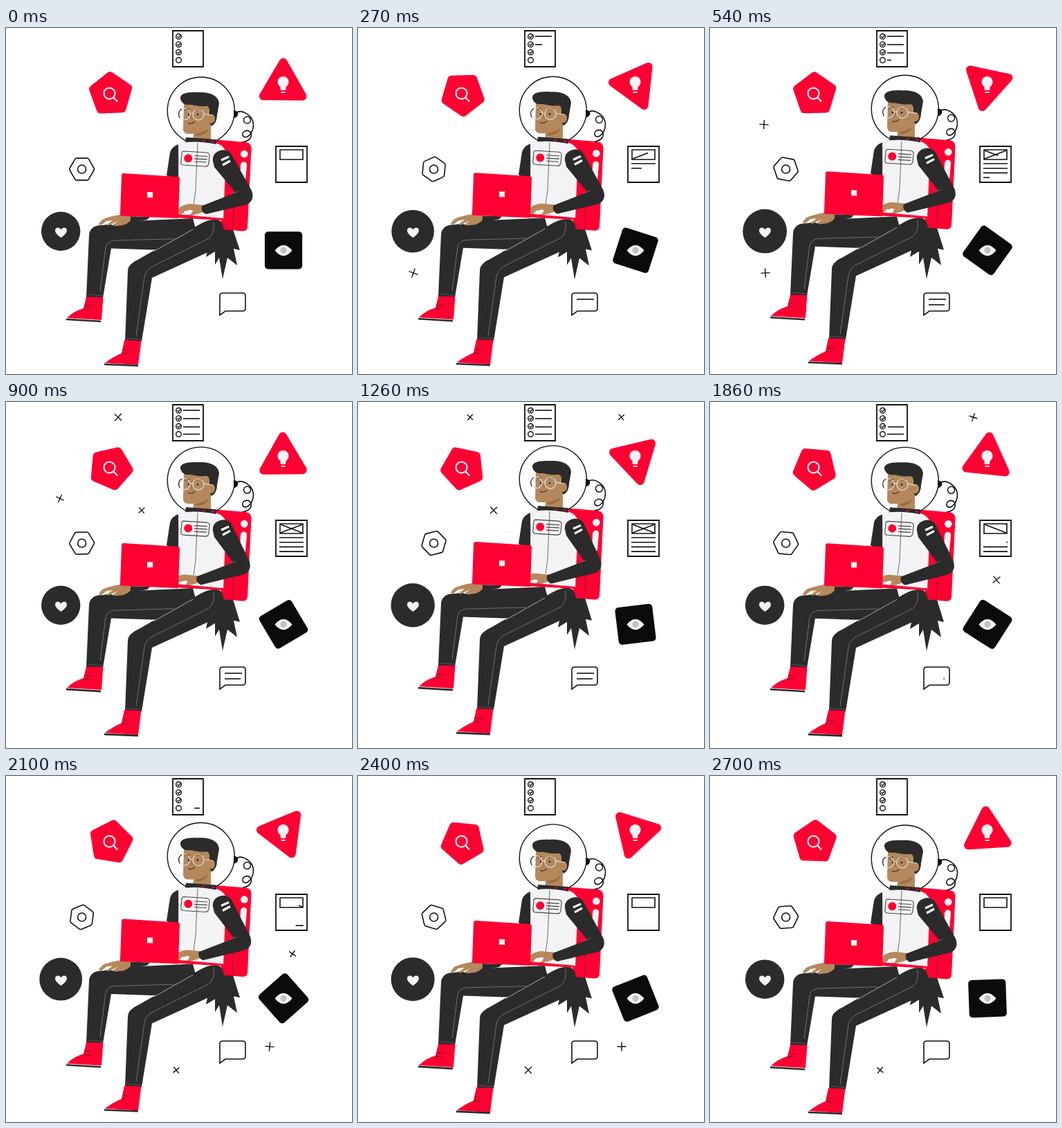
Recreate the animation shown at these times as an HTML page with a canvas. Size 500 by 500 pixels, loop 2.73 s.

```html
<!DOCTYPE html>
<html lang="en">
<head>
<meta charset="utf-8">
<title>Floating astronaut</title>
<style>
  html, body { margin: 0; width: 100%; height: 100%; overflow: hidden; background: #fff; }
  canvas { display: block; width: 500px; height: 500px; }
</style>
</head>
<body>
<canvas id="stage" width="500" height="500"></canvas>
<script>
const ctx = document.getElementById('stage').getContext('2d');
const LOOP = 2730, STEP = 30, TAU = Math.PI * 2;
const RED = '#ff0033', DARK = '#2b2b2b', INK = '#111', PALE = '#f3f3f5';
const SKIN = '#b5885c', SHADE = '#98703f', SEAM = '#707070', WHITE = '#fff';

const clamp = v => Math.max(0, Math.min(1, v));
const ramp = (t, start, end) => clamp((t - start) / (end - start));

function fill(d, color) {
  ctx.fillStyle = color;
  ctx.fill(new Path2D(d));
}

function line(d, color = INK, width = 1.6) {
  ctx.strokeStyle = color;
  ctx.lineWidth = width;
  ctx.stroke(new Path2D(d));
}

function disc(x, y, r, color) {
  ctx.fillStyle = color;
  ctx.beginPath();
  ctx.arc(x, y, r, 0, TAU);
  ctx.fill();
}

function ring(x, y, r, color = INK, width = 1.6) {
  ctx.strokeStyle = color;
  ctx.lineWidth = width;
  ctx.beginPath();
  ctx.arc(x, y, r, 0, TAU);
  ctx.stroke();
}

// Regular polygon with rounded corners; first corner points at `angle`.
function polygon(x, y, sides, radius, corner, angle) {
  const at = i => {
    const a = angle + i * TAU / sides;
    return [x + radius * Math.cos(a), y + radius * Math.sin(a)];
  };
  const [ax, ay] = at(0), [bx, by] = at(1);
  ctx.beginPath();
  ctx.moveTo((ax + bx) / 2, (ay + by) / 2);
  for (let i = 1; i <= sides; i++) ctx.arcTo(...at(i), ...at(i + 1), corner);
  ctx.closePath();
}

// Draws the part of consecutive segments between progress `from` and `to`.
function trace(segments, from, to) {
  const n = segments.length;
  segments.forEach(([x1, y1, x2, y2], i) => {
    const a = clamp(from * n - i), b = clamp(to * n - i);
    if (b <= a) return;
    const at = u => `${x1 + (x2 - x1) * u} ${y1 + (y2 - y1) * u}`;
    line(`M${at(a)}L${at(b)}`);
  });
}

function pentagon(p) {
  polygon(151.4, 95.6, 5, 33.7, 6, -Math.PI / 2 - p * TAU - 0.035);
  ctx.fillStyle = RED;
  ctx.fill();
  ring(149.5, 94.5, 8, PALE, 2.1);
  line('M155.5 100.5L161 106.5', PALE, 2.2);
}

function triangle(p) {
  polygon(400.3, 82.2, 3, 44.6, 6, -Math.PI / 2 + p * TAU + 0.01);
  ctx.fillStyle = RED;
  ctx.fill();
  disc(400.5, 78, 8, PALE);
  fill('M396 82H405L404 90H397Z', PALE);
  line('M397.5 93H403.5', PALE, 2);
}

function eyeTile(p) {
  polygon(401, 321.3, 4, 38.3, 5, Math.PI / 4 + p * Math.PI);
  ctx.fillStyle = '#0b0b0b';
  ctx.fill();
  fill('M388.5 321.5Q401 306 413.5 321.5Q401 337 388.5 321.5Z', PALE);
  disc(401, 321.3, 4.6, '#c2c2c2');
}

function heart(p) {
  disc(79.2, 293.7, 28.2 + 4 * Math.sin(3 * Math.PI * p) ** 2, DARK);
  fill('M79.5 303C74 299 71 296 71 292.5C71 287.5 77.5 287 79.5 291.5C81.5 287 88 287.5 88 292.5C88 296 85 299 79.5 303Z', PALE);
}

function nut(p) {
  polygon(109.6, 204, 6, 18.3, 3, p * TAU);
  ctx.strokeStyle = INK;
  ctx.lineWidth = 1.6;
  ctx.stroke();
  ring(109.6, 204, 6);
}

function checklist(t) {
  line('M241 4H285V56H241Z', INK, 1.8);
  for (let i = 0; i < 4; i++) {
    const y = 12.3 + i * 11.4;
    ring(249.5, y, 3.8, INK, 1.4);
    if (i < 3) line(`M247.5 ${y}L249.3 ${y + 1.6}L253 ${y - 2.5}`, INK, 1.4);
  }
  const rows = [12, 24, 36, 46.5].map(y => [256, y, 280, y]);
  trace(rows, ramp(t, 1555, 2150), ramp(t, 60, 650));
}

function article(t) {
  line('M390 171H435V223H390Z', INK, 1.8);
  line('M396 176H429V190H396Z');
  const from = ramp(t, 1590, 2145), to = ramp(t, 60, 650);
  trace([[397, 189, 428, 177], [397, 177, 428, 189]], from, to);
  trace([0, 1, 2, 3].map(i => [395, 196 + 6.7 * i, 430, 196 + 6.7 * i]), from, to);
}

function bubble(t) {
  line('M309 415V387Q309 383 313 383H342Q346 383 346 387V405Q346 409 342 409H317Z');
  trace([[316, 392, 341, 392], [316, 400, 339, 400]],
    ramp(t, 1270, 1880), ramp(t, 60, 480));
}

// x, y, start, duration
const sparkles = [
  [78, 139.5, 384, 580], [80, 354, 10, 725], [162, 22, 550, 720], [196, 156.5, 880, 740],
  [380.5, 22, 1240, 725], [414, 257, 1555, 575], [246, 425, 2080, 640], [381, 391, 1920, 640]
];

function sparkle(t, [x, y, start, duration]) {
  const u = (t - start) / duration;
  if (u <= 0 || u >= 1) return;
  const r = 5.6 + 1.4 * Math.sin(Math.PI * u);
  ctx.save();
  ctx.translate(x, y);
  ctx.rotate(Math.PI * (0.25 + u));
  line(`M${-r} 0H${r}M0 ${-r}V${r}`, INK, 1.4);
  ctx.restore();
}

function pack(lift) {
  const tip = 363 + 2.7 * Math.min(1, 1.5 * Math.sqrt(lift)), sag = tip - 363;
  fill(`M299 286L289 ${331 + sag}L302 ${323 + sag}L302 ${342 + sag}L308 ${332 + sag}L313 ${tip}L320 ${332 + sag}L334 ${343 + sag}L329 ${319 + sag}L338 ${321 + sag}L327 288Z`, DARK);
  line('M331 124C337 118 345 121 352 127C361 136 358 151 349 157C342 160 339 152 345 149C351 146 357 152 353 159C349 166 341 163 336 168');
  ring(348.5, 133, 5, INK, 1.5);
  fill('M329 119Q337 120 335 126Q333 130 329 130Z', INK);
  fill('M298 161L346 165Q355 166 354.5 175L349 288Q348 294 341 293.5L312 291Z', RED);
  line('M330 243L327 291', '#7a0a20', 1);
  disc(344.3, 182, 5.3, PALE);
  fill('M339 198Q340 193 344 193.5Q349 194 348 199L346 221Q345 225 341 224Q337 223 338 219Z', PALE);
}

function head() {
  ring(281.8, 119.5, 48.5, INK, 1.4);
  fill('M257 108L256 147Q257 153 264 153H271L270 162H296V132L296 106Z', SKIN);
  fill('M274 153Q286 151 293 145Q289 156 274 156Z', SHADE);
  fill('M252 102C251 95 262 92 277 93C294 92 307 97 308 109L305 126Q305 137 297 142L294 137L294 118Q293 112 288 113C276 114 270 110 261 111Q253 109 252 102Z', DARK);
  fill('M293 127C296 123 303 125 302 132C301 138 296 139 293 137Z', SKIN);
  line('M259 119Q262 116 265 118M274 119Q278 116 283 118', '#33251b', 1.2);
  disc(264, 125, 1.2, INK);
  disc(277, 125, 1.2, INK);
  line('M268 124L267 131L270 131', SHADE, 1);
  line('M263 137Q268 140 273 135', '#4d2f1f', 1.2);
  ring(258, 124.5, 8, '#dedede', 1.2);
  ring(278, 125, 8, '#dedede', 1.2);
  line('M266 124H270M286 124L299 126', '#dedede', 1.2);
  line('M254 117Q247 121 251 130', INK, 1.1);
}

function torso() {
  fill('M249 168Q239 172 237 180L232 213L250 222Z', DARK);
  fill('M250 166Q260 162 270 165L303 166Q316 170 319 182L315 277L248 274Z', PALE);
  fill('M318 179L330 220L327 290L314 278Z', RED);
  line('M277 166L274 235L271 256', '#6b6b6b', 1);
  fill('M260 158L303 161L304 168Q281 163 259 165Z', DARK);
  disc(285.5, 163, 1.6, RED);
  disc(299, 164, 1.6, RED);
  line('M257 178L290 180Q295 181 294 185L293 196Q292 200 288 200L256 198Q252 197 253 193L254 181Q254 178 257 178Z', '#444', 1.1);
  disc(263.3, 188.3, 6, RED);
  line('M272 184.5L291 185.5M272 188.8L291 189.8M272 193L290 194', '#444', 1.2);
}

function legs() {
  fill('M124 290Q128 285 139 285L182 279L270 275L281 317L210 320.5L152 318.5L140 390L116 389L120 300Q120 294 124 290Z', DARK);
  line('M270 304L157 307Q146 308 144 317L136 380', SEAM, 1);
  line('M117 385L141 387', '#555', 1);
  fill('M116 388.5L140.5 389L138 422L88 419Q98 409 112 405Z', RED);
  line('M87 421L137 424', DARK, 2.6);
  line('M114 401L124 402M112 406L121 407', '#7a0a20', 1);

  fill('M181 341Q185 337 192 334L281 283Q300 273 310 279Q318 289 313 303Q308 314 294 323L211 361L196 453L172 453L176 352Q176 345 181 341Z', DARK);
  line('M300 280Q302 297 293 304L211 345Q202 350 200 360L188 446', SEAM, 1);
  line('M213 323L270 291', '#a9a9a9', 1);
  line('M172 448L196 450', '#555', 1);
  fill('M171 451L195.5 452L191 487L143 484Q155 475 167 470Z', RED);
  line('M142 486L191 488', DARK, 2.6);
  line('M169 465L179 466M167 470L176 471', '#7a0a20', 1);
}

function leftHand() {
  fill('M175 272L208 273L204 277L178 282Z', DARK);
  fill('M146 281L160 276L165 282L154 285Z', WHITE);
  fill('M180 271L163 270Q147 273 139 277L134 283Q135 286 139 284L145 279L154 278L146 284Q147 287 151 284L162 279L155 284Q156 287 160 286L169 285Q176 283 180 278Z', SKIN);
}

function rightArm(lift) {
  const e = -5 * lift, h = -10 * lift, d = 1.5 * lift;
  ctx.save();
  ctx.translate(h, d);
  fill('M286 256L265 254Q253 256 248 262L246 270L253 271L259 264L264 265L258 271L269 271L282 267L288 264Z', SKIN);
  fill('M259 267Q264 261 270 264L267 269L259 271Z', PALE);
  ctx.restore();
  fill(`M299 192C297 178 316 171 325 181L${355 + e} 235Q${360 + e} 249 ${348 + e} 255L${289 + h} ${269 + d}Q${281 + h} ${266 + d} ${283 + h} ${257 + d}L${332 + e} 238L301 201Z`, DARK);
  line(`M${325 + e} 240L${336 + e} 236`, '#666', 1);
  line('M311 191L322 186M313 198L324 192', WHITE, 3.2);
}

function laptop() {
  fill('M245 269L314 275L314 278L245 274Z', RED);
  fill('M170 210L248 215Q251 215 251 218L249 275L167 271.5Q164 271 165 268L167 213Q167 210 170 210Z', RED);
  fill('M204 237H212V245H204Z', PALE);
}

function astronaut(p) {
  const lift = (1 - Math.cos(p * TAU)) / 2;
  ctx.save();
  ctx.translate(0, -8 * lift);
  pack(lift);
  head();
  torso();
  legs();
  leftHand();
  rightArm(lift);
  laptop();
  ctx.restore();
}

function draw(t) {
  const p = t / LOOP;
  ctx.fillStyle = WHITE;
  ctx.fillRect(0, 0, 500, 500);
  checklist(t);
  article(t);
  bubble(t);
  nut(p);
  pentagon(p);
  triangle(p);
  eyeTile(p);
  heart(p);
  sparkles.forEach(s => sparkle(t, s));
  astronaut(p);
}

const begin = performance.now();
function tick() {
  const elapsed = (performance.now() - begin) % LOOP;
  draw(Math.floor(elapsed / STEP) * STEP);
  requestAnimationFrame(tick);
}
tick();
</script>
</body>
</html>
```
